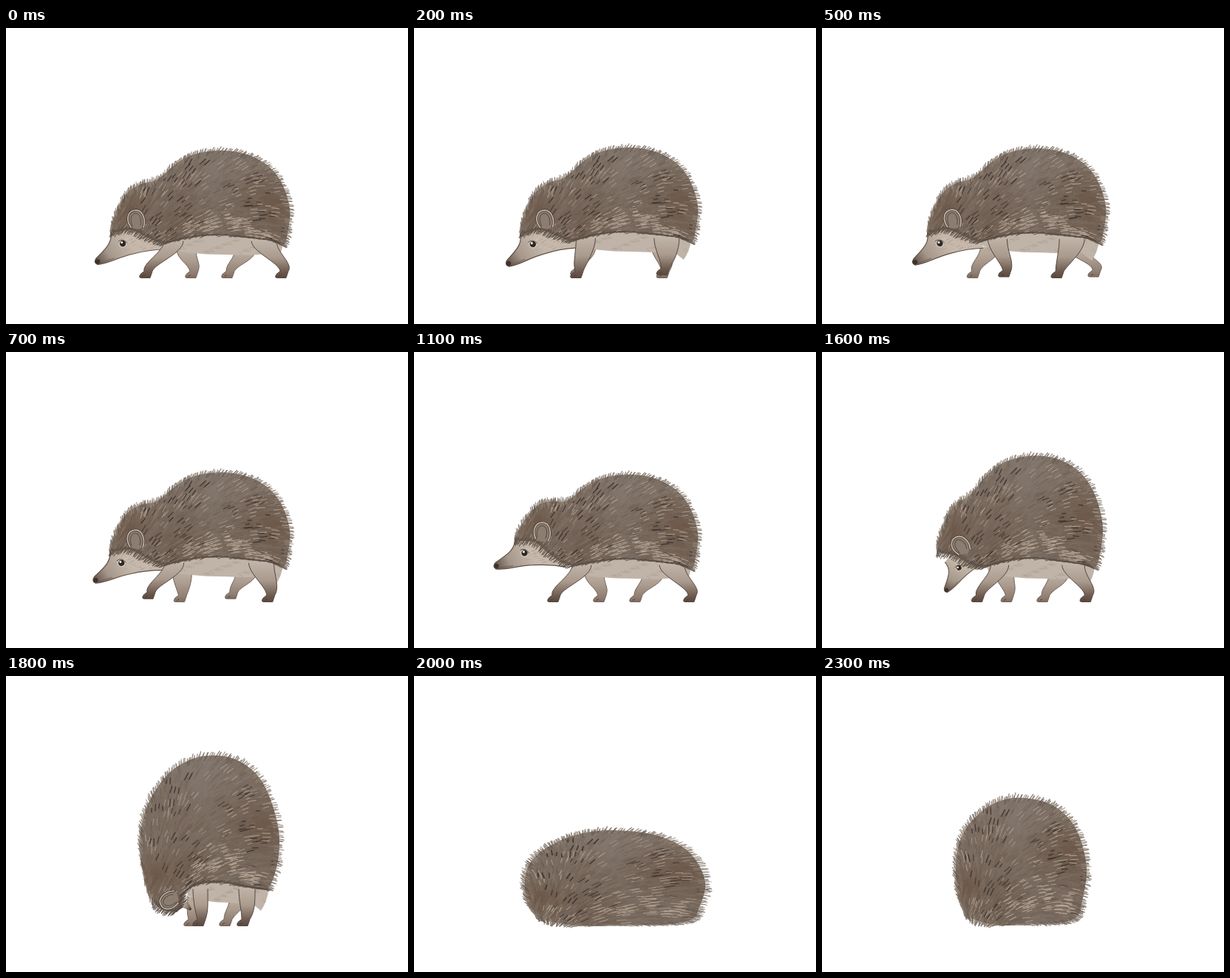
An HTML page with a canvas for the animation above (2800 ms loop, 544x401 px).

```html
<!DOCTYPE html>
<html lang="en">
<head>
<meta charset="utf-8">
<title>Hedgehog</title>
<style>
html, body { margin: 0; width: 100%; height: 100%; overflow: hidden; background: #fff; }
canvas { display: block; }
</style>
</head>
<body>
<canvas width="544" height="401"></canvas>
<script>
const g = document.querySelector('canvas').getContext('2d');

// Fur outline in three poses, same point order: face corner, back, rump, underside, cheek.
const WALK = [[143,276],[149,250],[163,225],[181,212],[205,205],[230,184],[255,171],[290,166],[325,171],[355,187],[374,212],[384,245],[382,272],[376,294],[362,288],[330,284],[285,280],[245,284],[212,291],[190,283],[168,273]];
const TUCK = [[200,307],[189,282],[183,245],[182,215],[188,185],[202,155],[227,126],[264,109],[305,111],[338,132],[357,165],[369,210],[368,250],[357,285],[345,288],[325,285],[290,279],[258,282],[240,295],[234,316],[216,318]];
const BALL = [[190,315],[183,290],[181,262],[184,232],[194,208],[210,189],[232,173],[262,165],[300,170],[326,185],[344,208],[355,240],[358,270],[352,305],[346,325],[325,334],[290,336],[255,337],[230,336],[212,332],[198,325]];
const N = WALK.length, PIVOT = [257, 238], EAR = [177, 260];
const GREYS = ['#74665b', '#84776b', '#958779', '#665a50'];

let seed = 11;
const rnd = () => (seed = (seed * 16807) % 2147483647) / 2147483647;
const lerp = (a, b, k) => a + (b - a) * k;
const mix = (p, q, k) => [lerp(p[0], q[0], k), lerp(p[1], q[1], k)];
const clamp = v => Math.max(0, Math.min(1, v));
const ease = k => k * k * (3 - 2 * k);

function turn([x, y], angle, [px, py] = PIVOT) {
  const c = Math.cos(angle), s = Math.sin(angle), dx = x - px, dy = y - py;
  return [px + dx * c - dy * s, py + dx * s + dy * c];
}

// Every hair keeps its place on the body: u along the outline, r out from the middle.
function makeHairs(clusters, size, width, len, colors, alpha, zone) {
  const list = [];
  for (let i = 0; i < clusters; i++) {
    const u = zone ? zone[0] + rnd() * zone[1] : rnd() * N, r = Math.sqrt(rnd()) * .95;
    const color = colors[Math.floor(rnd() * colors.length)], n = 1 + Math.floor(rnd() * size);
    for (let j = 0; j < n; j++)
      list.push({ u, r, color, alpha, width, off: (j - (n - 1) / 2) * 5, slide: (rnd() - .5) * 6,
        len: len * (.65 + rnd() * .7), bend: (rnd() - .5) * .3 });
  }
  return list;
}
const hairs = [
  ...makeHairs(620, 1, 3, 13, ['#8a7b6f', '#675649', '#77695e', '#735d4e'], .22),
  ...makeHairs(240, 1, 1, 9, ['#5b4d44', '#93857a'], .4),
  ...makeHairs(60, 3, 1.1, 9, ['#bcad9e', '#ab9c8d'], .7),
  ...makeHairs(38, 3, 1.1, 9, ['#c4b5a5'], .7, [9.5, 8]),
  ...makeHairs(42, 3, 1.3, 8, ['#352d29', '#453a33'], .85)
];
const spines = Array.from({ length: 330 }, (_, i) => ({
  u: (i + rnd()) * N / 330, len: 2 + rnd() * 4, back: 3 + rnd() * 5,
  color: GREYS[Math.floor(rnd() * 4)], bend: (rnd() - .5) * .4
}));

function line(x, y, angle, len, width, color, alpha = 1) {
  g.globalAlpha = alpha;
  g.strokeStyle = color;
  g.lineWidth = width;
  g.beginPath();
  g.moveTo(x, y);
  g.lineTo(x + Math.cos(angle) * len, y + Math.sin(angle) * len);
  g.stroke();
  g.globalAlpha = 1;
}

function shape(d, fill, stroke, width = 1.2) {
  const p = new Path2D(d);
  if (fill) { g.fillStyle = fill; g.fill(p); }
  if (stroke) { g.strokeStyle = stroke; g.lineWidth = width; g.stroke(p); }
}

function dot(x, y, r, color) {
  g.fillStyle = color;
  g.beginPath();
  g.arc(x, y, r, 0, 7);
  g.fill();
}

function poseAt(t) {
  const k = Math.floor((t - 1500) / 100), step = Math.min(t, 800) / 800;
  const sway = Math.abs(Math.sin(step * 2 * Math.PI));
  return {
    step, bob: -4 * sway,
    nod: .19 * clamp((t - 470) / 630) - .05 * sway,
    grow: k >= 0 ? 1.095 : 1,
    tuck: k < 1 ? 0 : [.3, .7, 1][Math.min(k - 1, 2)],
    ball: k < 4 ? 0 : k < 5 ? .55 : 1,
    scale: k === 5 ? [1.38, .75] : k === 6 || k === 7 ? [1.02, 1.045] : [1, 1]
  };
}

function bodyOf(p) {
  const pts = WALK.map((q, i) => {
    const w = clamp((230 - q[0]) / 70);
    const a = turn(q, p.nod * w);
    a[1] = 290 - (290 - a[1]) * lerp(p.grow, 1, w) + p.bob;
    return mix(mix(a, TUCK[i], p.tuck), BALL[i], p.ball);
  });
  const xs = pts.map(q => q[0]), ys = pts.map(q => q[1]);
  const x0 = Math.min(...xs), x1 = Math.max(...xs), y0 = Math.min(...ys), y1 = Math.max(...ys);
  const mid = mix(mix([275, 238 + p.bob], [275, 210], p.tuck), [270, 255], p.ball);
  const at = (u, r = 1) => {
    const i = Math.floor(u), f = u - i;
    const [a, b, c, d] = [-1, 0, 1, 2].map(n => pts[(i + n + N) % N]);
    return [0, 1].map(n => {
      const v = b[n] + .5 * f * (c[n] - a[n] + f * (2 * a[n] - 5 * b[n] + 4 * c[n] - d[n]
        + f * (3 * (b[n] - c[n]) + d[n] - a[n])));
      return lerp(mid[n], v, r);
    });
  };
  const curl = Math.max(p.tuck * .6, p.ball);
  const flow = (x, y) => {
    const nx = (2 * x - x0 - x1) / (x1 - x0), ny = (2 * y - y0 - y1) / (y1 - y0);
    return -.6 + .7 * nx + .35 * ny + curl * .6 * Math.min(0, nx);
  };
  return { at, flow, mid };
}

function fur(p) {
  const { at, flow, mid } = bodyOf(p);
  const path = new Path2D();
  for (let u = 0; u < N; u += .2) path.lineTo(...at(u));
  path.closePath();
  g.fillStyle = '#7a6c61';
  g.fill(path);
  g.save();
  g.clip(path);
  const wash = (u, r, size, rgb, alpha) => {
    const [x, y] = at(u, r), c = g.createRadialGradient(x, y, 0, x, y, size);
    c.addColorStop(0, `rgba(${rgb},${alpha})`);
    c.addColorStop(1, `rgba(${rgb},0)`);
    g.fillStyle = c;
    g.fillRect(0, 0, 544, 401);
  };
  wash(7, .9, 70, '139,130,123', .6);
  wash(11, .75, 60, '98,74,57', .6);
  wash(1, .85, 36, '98,72,54', .55);
  wash(18, .65, 50, '96,76,62', .5);
  wash(14, .5, 50, '116,104,95', .5);
  g.restore();
  for (const h of hairs) {
    const [x, y] = at(h.u, h.r), a = flow(x, y) + h.bend;
    const c = Math.cos(a), s = Math.sin(a), b = h.slide - h.len / 2;
    line(x + c * b - s * h.off, y + s * b + c * h.off, a, h.len, h.width, h.color, h.alpha);
  }
  for (const s of spines) {
    const [x, y] = at(s.u), under = s.u > 13.6 && !p.ball;
    const a = flow(x, y) + s.bend, out = Math.atan2(y - mid[1], x - mid[0]);
    const k = under ? 0 : .45;
    const dir = Math.atan2(Math.sin(a) + k * Math.sin(out), Math.cos(a) + k * Math.cos(out));
    const len = s.len * (1 + .2 * p.tuck) + s.back;
    line(x - Math.cos(dir) * s.back, y - Math.sin(dir) * s.back, dir, len, 1.15,
      under ? '#5a4d44' : s.color, .85);
  }
}

function leg(hx, hy, w, fx, fy, hock, near) {
  const tone = g.createLinearGradient(0, hy, 0, fy);
  tone.addColorStop(0, '#bfb2a6');
  tone.addColorStop(.45, '#a99a8d');
  tone.addColorStop(.85, near ? '#6b584d' : '#8f7d71');
  tone.addColorStop(1, near ? '#5a4940' : '#7d6b60');
  shape(`M${hx - w},${hy} C${hx - w},${hy + 14} ${fx - 9 + hock},${fy - 20} ${fx - 5},${fy - 9}
    L${fx - 10},${fy - 5} Q${fx - 13},${fy} ${fx - 9},${fy} L${fx + 3},${fy} L${fx + 6},${fy - 9}
    C${fx + 9 + hock},${fy - 20} ${hx + w},${hy + 16} ${hx + w},${hy}`, tone, near ? '#54463d' : '#726257', 1);
  line(fx - 7, fy - 2, -.6, 3, .8, '#3f332d');
}

// Foot position over one stride: half on the ground, half swinging forward.
function foot(phase, front, back) {
  phase %= 1;
  if (phase < .5) return [lerp(front, back, phase * 2), 338.5];
  const s = phase * 2 - 1;
  return [lerp(back, front, ease(ease(s))), 338.5 - 8 * Math.sin(Math.PI * s) * s];
}

function legs(p, near) {
  const m = p.tuck, front = foot(p.step + (near ? 0 : .5), 192, 254);
  const hind = foot(p.step + (near ? .5 : 0), 303, 376);
  const fx = lerp(front[0], near ? 264 : 252, m), bx = lerp(hind[0], near ? 324 : 300, m);
  const fh = lerp(near ? 232 + (fx - 220) * .18 : 232 + (fx - 220) * .35, near ? 263 : 256, m);
  const bh = lerp(near ? 342 + (bx - 340) * .2 : 335 + (bx - 340) * .3, near ? 326 : 314, m);
  const y = (near ? 289 : 299) + p.bob;
  leg(bh, y, lerp(near ? 17 : 14, 11, m), bx, hind[1], 4, near);
  leg(fh, y, lerp(13, 10, m), fx, front[1], 1, near);
}

function belly(p) {
  const x = lerp(209, 240, p.tuck), w = lerp(164, 113, p.tuck), y = 278 + p.bob;
  shape(`M${x},${y} h${w} l2,14 q-2,14 -10,26 l-15,-12 q-20,3 ${30 - w * .5},1 q${-w * .35},0 ${-w * .5},-10 z`, '#c0b4a8');
  for (let i = 0; i < 60; i++) {
    const f = (i + .5) / 60, top = y + 7 + (i * 37 % 19);
    line(x + 5 + f * (w - 10), top, .2 + (i % 5) * .15, 6, .8, i % 3 ? '#a99b8e' : '#92847a', .6);
  }
}

function headFrame(p, scale, draw) {
  const ear = turn(EAR, p.nod);
  ear[1] += p.bob;
  g.save();
  g.translate(...mix(ear, [221, 303], p.tuck));
  g.rotate(lerp(p.nod, -1.9, p.tuck));
  g.scale(scale, scale);
  g.translate(-EAR[0], -EAR[1]);
  draw();
  g.restore();
}

function face() {
  const tone = g.createLinearGradient(122, 318, 164, 288);
  tone.addColorStop(0, '#5d4d43');
  tone.addColorStop(.4, '#a5968a');
  tone.addColorStop(1, '#c5b8ab');
  const edge = 'M141,274 C146,290 134,300 122,312 Q118,318 124,320.5 C140,319 150,311 172,306 Q195,300 216,300';
  shape(edge + ' L216,270 L165,260 Z', tone);
  shape(edge, null, '#5f5046', 1.2);
  shape('M128,318 Q138,315 146,312', null, '#6a594e', .9);
  for (let i = 0; i < 26; i++)
    line(166 + i * 7 % 38, 285 + i * 5 % 14, 2.7, 5, .8, i % 2 ? '#927f72' : '#dbd0c5', .6);
  dot(158, 292, 5.6, '#d4c9bd');
  dot(158, 292, 4.2, '#302822');
  dot(156.6, 290.6, 1.5, '#fff');
  shape('M152,289 Q158,284 164,291', null, '#55463d', .9);
  dot(124, 316.5, 3.2, '#3f332d');
}

function ear() {
  const rim = 'M169,270 C161,258 166,248 174,247 C184,245 190,259 186,270';
  shape(rim + ' Q179,275 169,270', '#8b7d71');
  shape(rim, null, '#4a3e37', 3.4);
  shape(rim, null, '#c2b6a8', 1.7);
  shape('M171,268 C167,258 170,252 175,251 C181,251 184,260 182,267', null, '#5c4e45', 1);
}

function draw(t) {
  const p = poseAt(t);
  g.clearRect(0, 0, 544, 401);
  g.lineCap = g.lineJoin = 'round';
  g.save();
  g.translate(p.scale[0] > 1.2 ? 274 : 271, 341);
  g.scale(...p.scale);
  g.translate(-271, -341);
  if (p.ball < 1) {
    legs(p, false);
    if (!p.ball) headFrame(p, lerp(1, .4, p.tuck), face);
    belly(p);
    legs(p, true);
  }
  fur(p);
  if (!p.ball) headFrame(p, 1, ear);
  g.restore();
}

let shown = -1;
function tick() {
  const t = Math.floor(performance.now() % 2800 / 100) * 100;
  if (t !== shown) draw(shown = t);
  requestAnimationFrame(tick);
}
tick();
</script>
</body>
</html>
```
